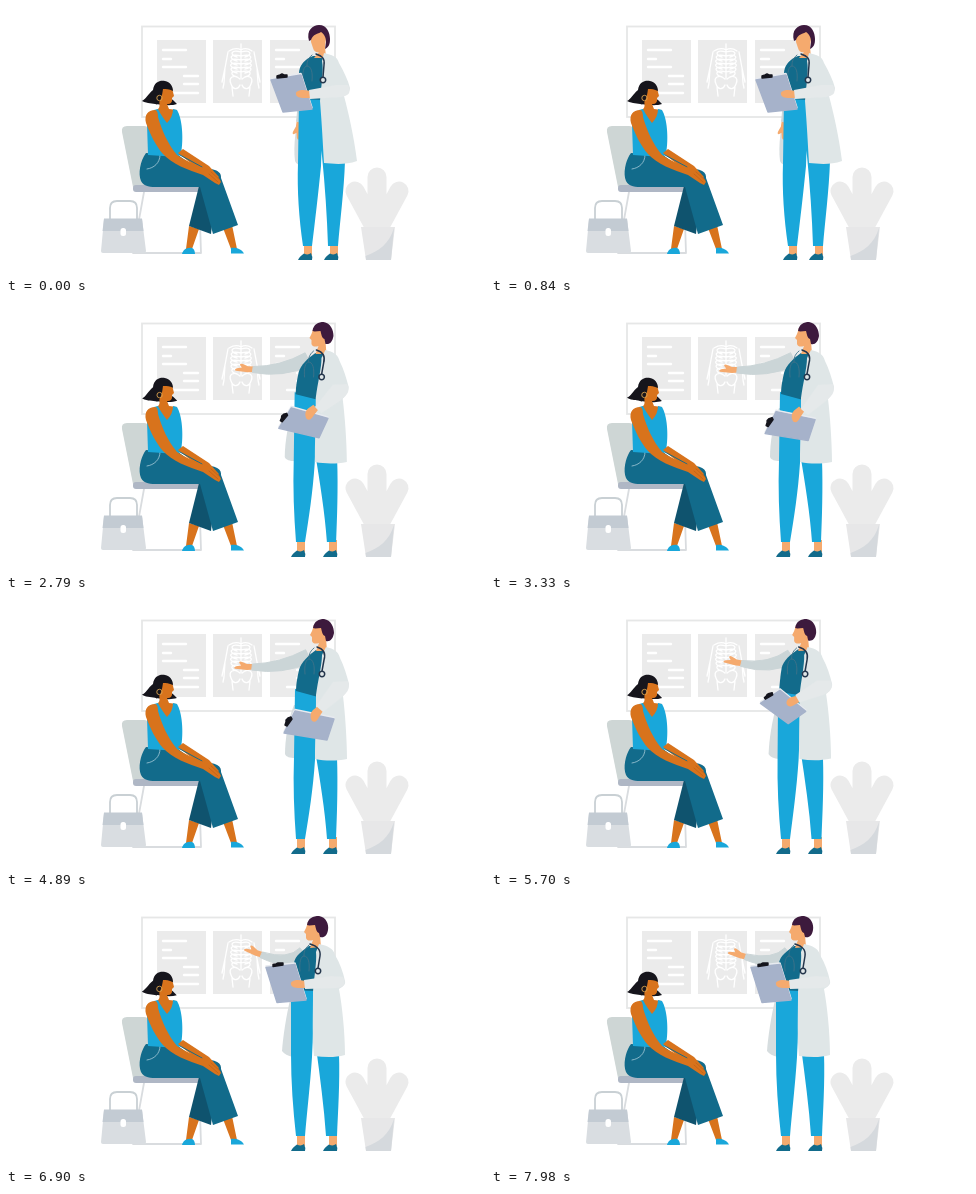
Recreate the animation shown at these times as an HTML page. Size 479 px wide and 269 px high, loop 8000 ms.

```html
<!DOCTYPE html>
<html lang="en">
<head>
<meta charset="utf-8">
<title>Consultation</title>
<style>
html, body { margin: 0; width: 100%; height: 100%; overflow: hidden; background: #fff; }
svg { display: block; width: 100vw; height: 100vh; }
.line { fill: none; stroke-linecap: round; stroke-linejoin: round; }
</style>
</head>
<body>
<svg viewBox="0 0 479 269">
  <g id="board">
    <rect x="136" y="20.5" width="193" height="90.5" fill="#fff" stroke="#e6e7e7" stroke-width="1.8"/>
    <path fill="#ebebeb" d="M151 34h49v63h-49zM207 34h49v63h-49zM264 34h49v63h-49z"/>
    <path class="line" stroke="#fff" stroke-width="2.4" d="M157 44h23M157 53h8M157 61h23M178 70h14M178 78h14M168 87h24M270 44h23M270 53h8M270 61h23M291 70h14M291 78h14M281 87h24"/>
    <path id="bones" class="line" stroke="#fff" stroke-width="1.3"/>
  </g>

  <g id="plant">
    <path class="line" stroke="#ebebeb" stroke-width="19" d="M371 171V220M349 185L369 222M393 185L373 222"/>
    <path fill="#e7e7e8" d="M355 221H389L385 254H360Z"/>
    <path fill="#d5d9dd" d="M388 222L385 254H360L359.500 250C373 245 383 238 388 222Z"/>
  </g>

  <g id="chair">
    <path fill="#ced6d5" d="M121 120H138Q142 120 143 124L152 181H127L116 126Q115 120 121 120Z"/>
    <path class="line" stroke="#d9dcdf" stroke-width="1.8" d="M138 186L127 247H195L193 186"/>
    <rect x="127" y="179" width="67" height="7" rx="3" fill="#afb7c5"/>
  </g>

  <g id="bag">
    <path class="line" stroke="#c9d0d4" stroke-width="1.8" d="M104 213V202Q104 195 111 195H124Q131 195 131 202V213"/>
    <path fill="#d9dde1" d="M98 213H136L140 245Q140 247 138 247H97Q95 247 95 245Z"/>
    <path fill="#c3cbd3" d="M98 212.500H136L137.500 225H96.500Z"/>
    <rect x="114.500" y="222" width="5.500" height="8" rx="2.500" fill="#fff"/>
  </g>

  <g id="patient">
    <path fill="#d8731c" d="M183 220L193 223L186 243H180ZM217 222L226 219L231 243L225 243Z"/>
    <path fill="#19a7da" d="M176 248C177 244 180 242 183 242C187 241 189 244 189 248ZM225 247.500L225 242C229 241 236 243 238 247.500Z"/>
    <path fill="#0f536e" d="M193 180L210 182L205 228L183 220Z"/>
    <path fill="#126b8b" d="M140 147C134 155 132 168 135 175C138 181 145 181 152 181H194L207 228L232 219L215 172C216 164 206 162 190 162L172 149Z"/>
    <path class="line" stroke="#a6cbd8" stroke-width=".8" d="M154 149C154 157 148 162 141 163"/>
    <path id="mane" fill="#16151c" d="M153 84L162 91L167 94L171 98C165 100 158 99 150 98Z"/>
    <path fill="#d8731c" d="M150 104C154 103 154 100 153 94L156 82H166L168 90L166 92L166 95C165 98 163 98 161 98L163 103L171 104L161 120Z"/>
    <path fill="#19a7da" d="M148 104L152 103C155 109 158 113 161 117C165 113 167 108 167 103L171 104C176 112 178 132 175 148L172 151L142 149L141 118Z"/>
    <path fill="#d8731c" d="M172 147L177 143L203 160L213 171L206 174Z"/>
    <path class="line" stroke="#126b8b" stroke-width="1" d="M174 149L196 161"/>
    <path fill="#d8731c" d="M149 104C142 104 138 109 140 117C145 130 150 140 157 148C166 158 182 164 197 169L209 177L213 179L215 176C212 169 207 165 200 163C190 159 178 154 171 149C162 138 156 125 152 111C152 107 151 104 149 104Z"/>
    <path class="line" stroke="#b95d15" stroke-width=".6" d="M203 168L212 176M205 166L214 174"/>
    <g id="fringe">
      <path fill="#16151c" d="M147 84C148 76 154 74 159 75C164 76 167 80 167 85C163 83 160 83 157 83C156 90 155 95 151 98.500C146 97 142 98 136 95C140 93 142 88 147 84Z"/>
      <circle cx="153.500" cy="92" r="2.700" fill="none" stroke="#d9a14e" stroke-width=".9"/>
    </g>
  </g>

  <g id="doctor"></g>
</svg>
<script>
const LOOP = 8000;
const $ = id => document.getElementById(id);
const skin = '#f5aa6e', teal = '#126b8b', cyan = '#19a7da';
const clamp = x => Math.min(1, Math.max(0, x));
const ease = (t, from, to) => {
  const x = clamp((t - from) / (to - from));
  return x * x * (3 - 2 * x);
};
const lerp = (a, b, x) => a + (b - a) * x;

// Blend every number of matching strings along pose 0 → 1 → 2.
const NUM = /-?\d*\.?\d+/g;
function blend(poses, k) {
  const i = k < 1 ? 0 : 1, to = poses[i + 1].match(NUM);
  let n = 0;
  return poses[i].replace(NUM, v => lerp(+v, +to[n++], k - i).toFixed(2));
}

function add(attrs) {
  const el = document.createElementNS('http://www.w3.org/2000/svg', 'path');
  for (const name in attrs) el.setAttribute(name, attrs[name]);
  $('doctor').append(el);
  return el;
}

const morphs = [];
function morph(attrs, ...poses) {
  const el = add(attrs);
  morphs.push([el, 'd', poses]);
  return el;
}
function shift(attrs, ...spots) {
  morphs.push([add(attrs), 'transform', spots.map(s => `translate(${s})`)]);
}

// Poses: holding the chart, explaining, pointing at the scan.
morph({ fill: '#d6dddf' },
  'M294 105C290 118 287 140 289 155C290 158 293 159 296 159L300 105Z',
  'M284 103C280 120 277 140 276 154C278 157 282 159 287 160L292 100Z',
  'M288 105C282 120 279 140 279 154C280 157 284 158 289 158L295 105Z');
const palm = add({ fill: skin, d: 'M-2 -2.500L5 -3L17 -2Q19 -1 16 .5L11 1.500L13 4Q13 6 10 5L5 3L-2 3Z' });
const sleeve = add({ fill: '#cbd5d7', stroke: '#cbd5d7', 'stroke-linejoin': 'round' });

const ankle = { fill: skin, d: 'M0 -11H8V1H0Z' };
const shoe = { fill: teal, d: 'M-6 6C-5 3 -2 1 0 -.5Q4 1.500 7 -1Q9 3 8 6Z' };
for (const part of [ankle, shoe]) {
  shift(part, '298 248', '291 248', '291 248');
  shift(part, '324 248', '323 248', '323 248');
}
morph({ fill: cyan },
  'M306 93L320 93L339 155C338 185 334 215 332 240L322 240C321 210 319 180 316 150Z',
  'M300 93L314 93L333 157C334 185 332 215 331 239L320 239C318 210 314 180 310 150Z',
  'M304 93L317 93L331 157C332 185 331 215 330 239L321 239C319 210 314 180 309 150Z');
morph({ fill: cyan },
  'M293 92L316 92C316 115 316 140 315 160C312 190 309 215 306 240L297 240C293 212 291 185 292 157Z',
  'M285 92L308 92C308 115 307 140 306 160C304 190 301 215 299 239L290 239C287 212 285 185 285 157Z',
  'M289 89L311 92C311 115 310 140 309 160C307 190 303 215 299 239L290 239C288 212 287 185 288 157Z');
morph({ fill: teal },
  'M307 50C299 53 293 59 293 68C293 78 296 85 296 93L317 94L320 50Z',
  'M303 49C296 54 289 59 288 66C287 76 287 84 286 93L309 94L315 49Z',
  'M310 50C303 55 295 62 293 70C291 79 290 85 290 91L312 97L321 50Z');
morph({ fill: skin },
  'M307 25L305 31L305 36L306 39L307 42C308 46 311 47 313 46L308 52L320 52L319 40L321 25Z',
  'M302 25L300 31L298 35L300 37L300 41C301 44 304 44 307 43L304 51L315 50L314 38L316 28Z',
  'M308 25L306 31L304 35L306 37L306 41C307 44 310 44 313 43L310 51L321 51L320 38L322 28Z');
morph({ fill: '#3d1a3d' },
  'M303 35C300 24 307 19 313 19C321 19 324 27 324 33C324 38 323 41 319 43L320 36C320 31 318 28 315 26C312 28 307 28 305 34Z',
  'M301 28C302 21 307 19 313 19C320 20 323 27 322 33C321 39 318 41 314 40L313 36C310 35 310 31 309 28C306 28 303 29 301 28Z',
  'M307 28C308 21 313 19 318 19C325 20 328 27 328 33C327 39 324 42 320 41L319 36C316 35 316 31 315 28C312 28 309 29 307 28Z');
morph({ fill: '#dfe6e7' },
  'M318 47C326 49 331 50 333 57C338 66 342 74 344 82C344 86 340 88 338 90C342 105 348 130 351 155C340 159 328 158 318 157C317 140 316 120 314 95C315 80 318 65 316 55Z',
  'M313 47C322 49 327 51 329 58C334 66 337 75 339 84C340 88 336 90 333 92C336 108 339 135 339 158C328 161 318 160 308 159C306 140 307 120 307 95C308 80 311 65 310 55Z',
  'M320 47C328 49 332 51 334 58C338 66 341 76 343 84C343 88 340 92 337 96C339 112 341 140 341 159C330 161 320 161 309 159C309 140 310 120 310 95C312 80 316 65 316 55Z');
shift({ class: 'line', stroke: '#3f7289', 'stroke-width': .9,
  d: 'M306 49C301 53 301 57 301 60M297 75C296 66 298 60 301 60C305 60 307 66 306 75' },
  '0 0', '-3 -1', '2 -1');
morph({ class: 'line', stroke: '#24364c', 'stroke-width': 1.5 },
  'M310 48C316 50 319 52 318 59L317 71',
  'M304 47C311 49 315 52 314 59L312 71',
  'M311 47C318 49 320 53 318 60L316 71');
shift({ fill: '#dfe6e7', stroke: '#24364c', 'stroke-width': 1.5, d: 'M-2.700 0A2.700 2.700 0 1 1 2.700 0A2.700 2.700 0 1 1 -2.700 0Z' },
  '317 74', '312 74', '316 74');

// The clip sits on the first edge, so the chart turns on its side in the last pose.
const chart = [
  'M265 74L295 69L306 103L277 106Z',
  'M260 70.5L289 67.5L300 103L271 105.5Z',
  'M278 133L289 111L328 119L321 140Z'];
const round = { 'stroke-width': 1.4, 'stroke-linejoin': 'round' };
const held = [
  morph({ fill: '#e8ebf0', stroke: '#e8ebf0', ...round }, ...chart),
  morph({ fill: '#a6b2ca', stroke: '#a6b2ca', ...round }, ...chart),
  morph({ fill: '#15151d', stroke: '#15151d', ...round },
    'M271 72L271 70L274 69L276 68L278 69L281 69L281 71Z',
    'M267 69.5L267 67.5L270 67L272 66L274 66L277 66L277 68Z',
    'M281 126L279 125L280 122L280 120L282 118L285 117L286 119Z'),
  morph({ fill: skin },
    'M306 85L297 84C293 84 289 86 290 88C290 91 294 92 298 92L306 92Z',
    'M301 84L292 83C288 83 284 85 285 87C285 90 289 91 293 91L301 91Z',
    'M312 106L307 110C304 113 304 117 306 121C309 123 311 121 313 117L317 111Z')
];
morph({ fill: '#e5e9ea' },
  'M342 79C346 87 342 90 335 91L304 93L303 84L330 79Z',
  'M337 80C341 87 337 91 330 91L299 92L298 83L325 79Z',
  'M342 81C345 90 340 93 335 98L317 112L310 106L327 82Z');

// Pointing arm: shoulder x, y, then angle and length of upper arm, forearm, and the hand angle.
const arms = [
  '304 60 98 28 103 29 98',
  '299 57 140 20 203 31 200',
  '303 57 155 31 186 29 181'];
function moveArm(k, dip) {
  const [x, y, upAngle, up, lowAngle, low, hand] = blend(arms, k).split(' ').map(Number);
  const rad = Math.PI / 180;
  const a = upAngle * rad, b = (lowAngle - dip) * rad;
  const ex = x + up * Math.cos(a), ey = y + up * Math.sin(a);
  const wx = ex + low * Math.cos(b), wy = ey + low * Math.sin(b);
  const side = (px, py, ang, w) => `${px + w * Math.sin(ang)} ${py - w * Math.cos(ang)}`;
  const mid = (a + b) / 2;
  sleeve.setAttribute('d', `M${side(x, y, a, 6)}Q${side(ex, ey, mid, 5)} ${side(wx, wy, b, 3)}` +
    `L${side(wx, wy, b, -3)}Q${side(ex, ey, mid, -7)} ${side(x, y, a, -8)}Z`);
  palm.setAttribute('transform', `translate(${wx} ${wy}) rotate(${hand - dip})`);
}

// Skeleton scan: spine, ribs, arms, pelvis and thighs.
let bones = 'M235 38V72M223 45Q230 41 235 44Q240 41 246 45';
for (let i = 0; i < 6; i++) {
  const y = 46 + i * 4, w = 10 + Math.sin(i * .6) * 2;
  for (const s of [-1, 1]) bones += `M235 ${y}C${235 + s * w} ${y - 3} ${235 + s * (w + 2)} ${y + 3} ${235 + s * 4} ${y + 5}`;
}
for (const s of [-1, 1]) {
  const at = (x, y) => `${235 + s * x} ${y}`;
  bones += `M${at(13, 46)}L${at(16, 62)}L${at(19, 76)}M${at(16, 62)}L${at(17, 77)}L${at(18, 82)}`;
  bones += `M${at(1, 73)}C${at(7, 68)} ${at(13, 71)} ${at(10, 78)}C${at(8, 84)} ${at(3, 84)} ${at(1, 79)}M${at(9, 81)}L${at(8, 90)}`;
}
$('bones').setAttribute('d', bones);

function draw(now) {
  const t = now % LOOP;
  const k = ease(t, 900, 1620) + ease(t, 2070, 2950) - ease(t, 5300, 6130);
  for (const [el, name, poses] of morphs) el.setAttribute(name, blend(poses, k));

  // The lowered chart swings back into place after the turn.
  const drift = clamp(k - 1) * (1 - ease(t, 3200, 4500));
  held.forEach((el, i) => {
    const lift = i ? 0 : -1.5;
    el.setAttribute('transform', `translate(${-4 * drift} ${-2.5 * drift + lift})`);
  });
  moveArm(k, 4 * ease(t, 7600, 8000));

  const sway = Math.sin(t / LOOP * 10 * Math.PI);
  for (const id of ['mane', 'fringe']) $(id).setAttribute('transform', `rotate(${sway} 158 84)`);
  requestAnimationFrame(tick);
}
const start = performance.now();
function tick() { draw(performance.now() - start); }
tick();
</script>
</body>
</html>
```
